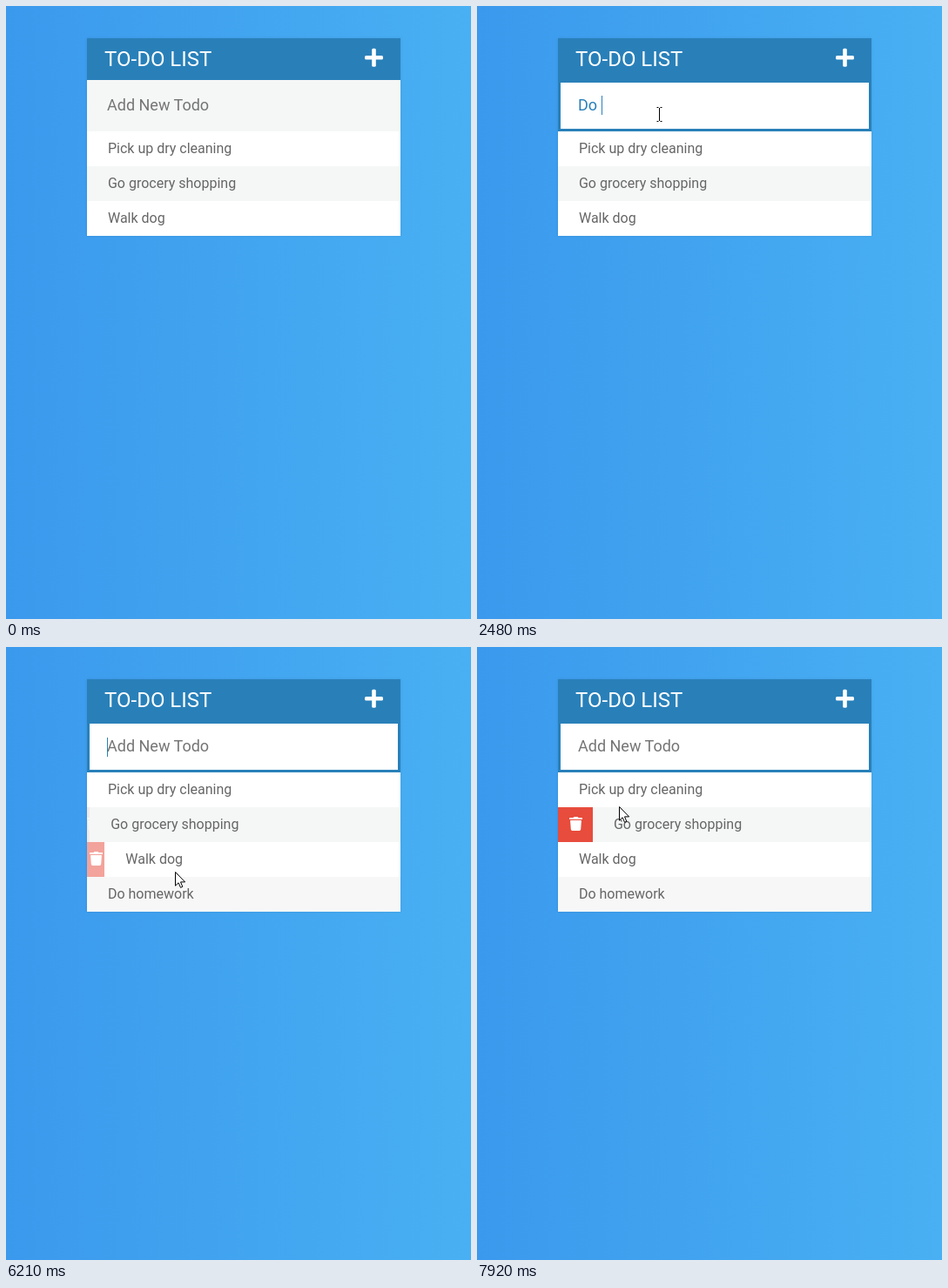
Write an HTML page that moves like this. It is 534 px wide and 704 px high and loops after 8000 ms.

```html
<!DOCTYPE html>
<html lang="en">
<head>
<meta charset="utf-8">
<title>To-Do List</title>
<style>
  html, body { margin: 0; width: 100%; height: 100%; overflow: hidden; }
  body { position: relative; font: 16px Roboto, sans-serif; background: linear-gradient(to right, #3b99ed, #49b0f3); }
  #card { position: absolute; left: 93px; top: 37px; width: 360px; box-shadow: 0 0 3px rgba(0, 0, 0, .1); }
  h1 { position: relative; margin: 0; padding: 10px 20px; height: 28px; font-size: 24px; line-height: 28px;
       font-weight: 400; color: #fff; background: #2980b9; }
  h1 svg { position: absolute; left: 319px; top: 11px; fill: #fff; }
  #field { box-sizing: border-box; height: 59px; padding: 15px 20px; border: 3px solid transparent;
           font-size: 18px; line-height: 21px; white-space: pre; color: #2980b9; background: #f5f7f6; }
  #field.focus { background: #fff; border-color: #2980b9; }
  #hint { color: #757575; }
  #caret { position: absolute; width: 1px; height: 22px; background: #2980b9; }
  ul { margin: 0; padding: 0; list-style: none; }
  li { display: flex; height: 40px; line-height: 40px; color: #666; background: #fff; }
  li:nth-child(2) { background: #f5f7f6; }
  li:nth-child(4) { background: #f7f7f7; }
  .bin { position: relative; flex: none; height: 40px; background: #e74c3c; }
  .bin svg { position: absolute; top: 11px; fill: #fff; }
  .label { align-self: center; margin-left: 23.96px; white-space: nowrap; }
  #pointer { position: absolute; left: 0; top: 0; overflow: visible; }
</style>
</head>
<body>
<div id="card">
  <h1>TO-DO LIST
    <svg width="21" height="22"><rect y="9" width="21" height="4.6" rx="1.5"/><rect x="8.2" y=".8" width="4.6" height="21" rx="1.5"/></svg>
  </h1>
  <div id="field"><span id="typed"></span><i id="caret"></i><span id="hint">Add New Todo</span></div>
  <ul id="list"></ul>
</div>
<svg id="pointer" width="1" height="1">
  <path id="arrow" d="M.5 -.5V15.2L4.1 11.8 6.5 17.3 8.8 16.3 6.5 10.9H11.6Z" fill="#fff" stroke="#000"/>
  <path id="beam" d="M-2.5 -7.5H-.5M1.5 -7.5H3.5M.5 -7V8M-2.5 8.5H-.5M1.5 8.5H3.5" fill="none" stroke="#000"/>
</svg>
<script>
const LOOP = 8000, FPS = 13, SLIDE = 200, STEP = 2;
const ENTER = 70, FOCUS = 1460, TYPE = 2160, PAUSE = 4640, SUBMIT = 4810;
const LIST_TOP = 144, ROW = 40, ICON = 15;
const $ = id => document.getElementById(id);

const tasks = ['Pick up dry cleaning', 'Go grocery shopping', 'Walk dog', 'Do homework'];
const bursts = [
  { text: 'Do ', start: TYPE, gap: 160 },
  { text: 'ho', start: 2940, gap: 310 },
  { text: 'mework', start: 3480, gap: 126 }
];

// Pointer strokes, each eased from wherever the last one stopped.
const strokes = [
  { from: 54, to: 131, x: 429, y: 687 },
  { from: 285, to: 573, x: 268, y: 224 },
  { from: 573, to: 745, x: 230, y: 184 },
  { from: 745, to: 913, x: 211, y: 140 },
  { from: 1146, to: 1531, x: 209, y: 124 },
  { from: 5746, to: 5823, x: 236, y: 158 },
  { from: 5823, to: 6370, x: 183, y: 284 },
  { from: 6736, to: 7030, x: 162, y: 236 },
  { from: 7200, to: 7540, x: 159, y: 191 },
  { from: 7613, to: 7900, x: 163, y: 184 }
];

const rows = tasks.map(text => {
  const item = document.createElement('li');
  item.innerHTML = `<div class="bin"><svg width="${ICON}" height="16" viewBox="0 0 14 16" preserveAspectRatio="none"><path d="M0 2.6V1.7Q0 1 .7 1H4.2L4.6 .4Q4.8 0 5.2 0H8.8Q9.2 0 9.4 .4L9.8 1H13.3Q14 1 14 1.7V2.6Q14 3 13.6 3H.4Q0 3 0 2.6ZM1 4.4Q1 4 1.4 4H12.6Q13 4 13 4.4L12.3 14.6Q12.2 16 10.8 16H3.2Q1.8 16 1.7 14.6Z"/></svg></div><span class="label">${text}</span>`;
  $('list').append(item);
  return { item, bin: item.firstChild, icon: item.querySelector('svg'), label: item.lastChild };
});

function pointerAt(t) {
  let x = 434, y = 697;
  for (const stroke of strokes) {
    if (t <= stroke.from) break;
    const u = Math.min(1, (t - stroke.from) / (stroke.to - stroke.from));
    const k = (1 - Math.cos(Math.PI * u)) / 2;
    x += (stroke.x - x) * k;
    y += (stroke.y - y) * k;
  }
  return { x, y };
}

// Hovered bins open at a constant rate, all others close.
function binsAt(t) {
  const open = tasks.map(() => 0);
  for (let s = 0; s < t; s += STEP) {
    const hovered = Math.floor((pointerAt(s).y - LIST_TOP) / ROW);
    const delta = Math.min(STEP, t - s) / SLIDE;
    open.forEach((v, i) => {
      open[i] = Math.max(0, Math.min(1, v + (i === hovered ? delta : -delta)));
    });
  }
  return open;
}

function typedAt(t) {
  if (t >= SUBMIT) return '';
  return bursts.map(({ text, start, gap }) =>
    text.slice(0, Math.max(0, Math.floor((t - start) / gap) + 1))).join('');
}

function caretOn(t) {
  if (t >= SUBMIT) return (t - SUBMIT) % 1040 < 550 && t < 7900;
  return t >= FOCUS && t < FOCUS + 550 || t >= TYPE && t < PAUSE;
}

function overText({ x, y }) {
  if (y >= 85 && y < LIST_TOP) return true;
  return rows.some(({ label }) => {
    const box = label.getBoundingClientRect();
    return x >= box.left && x <= box.right && Math.abs(y - (box.top + box.bottom) / 2) < 9;
  });
}

function show(element, visible) {
  element.style.display = visible ? '' : 'none';
}

function draw(t) {
  // Pointer and hover motion advance at the recorder's frame rate.
  const held = 900 + Math.floor((t - 900) * FPS / 1000) * 1000 / FPS;

  const typed = typedAt(t);
  $('field').className = t >= FOCUS ? 'focus' : '';
  $('typed').textContent = typed;
  show($('hint'), !typed);
  show($('caret'), caretOn(t));
  $('caret').style.marginTop = typed ? 0 : '1px';

  show(rows[3].item, t >= SUBMIT);
  binsAt(held).forEach((open, i) => {
    const { bin, icon } = rows[i], width = ROW * open;
    bin.style.width = width + 'px';
    bin.style.opacity = open;
    icon.style.left = Math.max(0, (width - ICON) / 2) + 'px';
  });

  const point = pointerAt(held), beam = overText(point);
  show($('pointer'), t >= ENTER);
  show($('beam'), beam);
  show($('arrow'), !beam);
  $('pointer').style.transform = `translate(${Math.round(point.x)}px, ${Math.round(point.y)}px)`;
}

function tick() {
  draw(performance.now() % LOOP);
  requestAnimationFrame(tick);
}
tick();
</script>
</body>
</html>
```
